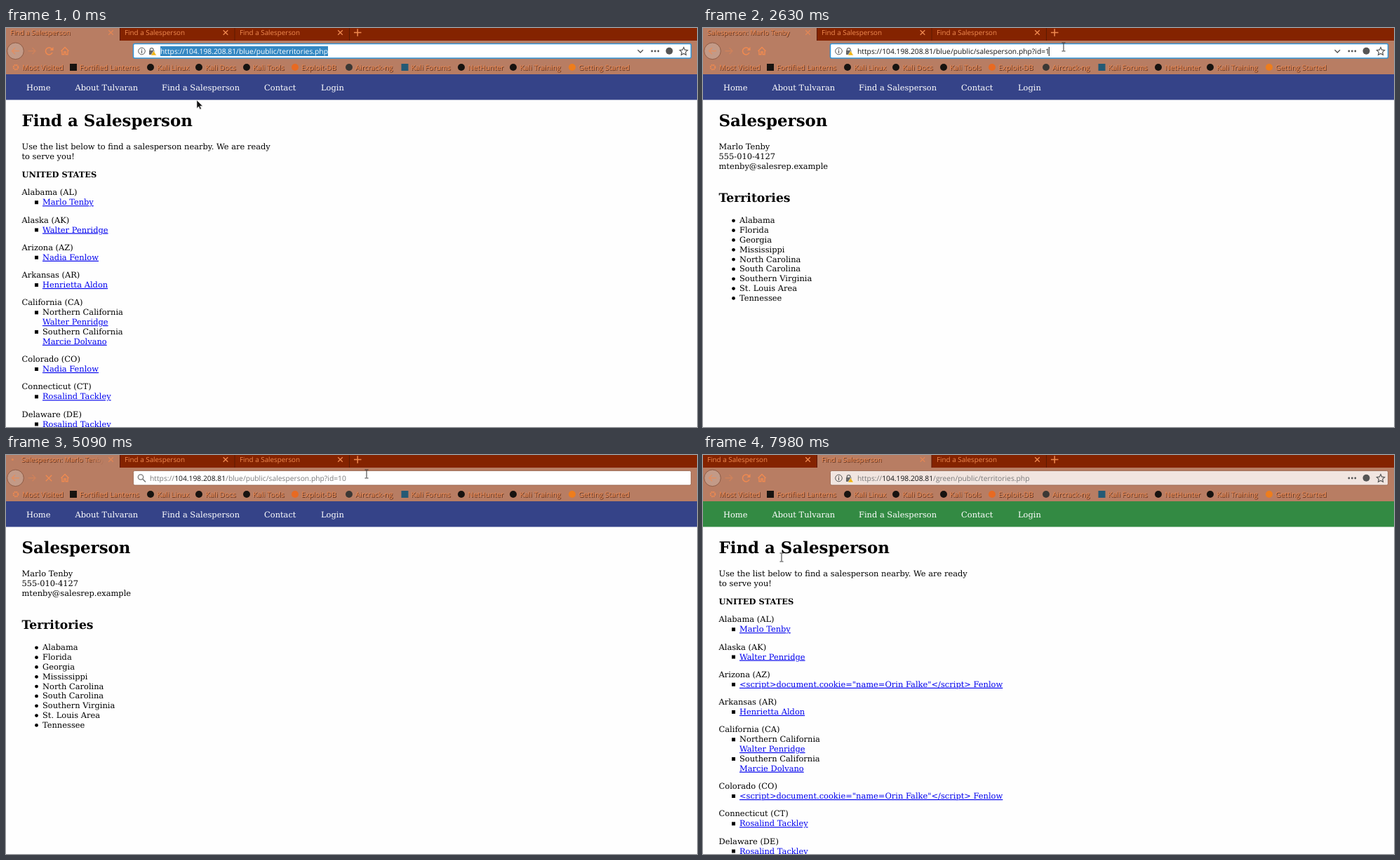
An HTML page for the animation above (8000 ms loop, 985 by 569 pixels).

```html
<!DOCTYPE html>
<html lang="en">
<head>
<meta charset="utf-8">
<title>Territories</title>
<style>
html, body { margin: 0; width: 100%; height: 100%; overflow: hidden; background: #fefefe }
svg { display: block; width: 100vw; height: 100vh; text-rendering: geometricPrecision }
.ui { font: 10.3px "Open Sans", "Noto Sans", sans-serif }
.page { font: 11.45px "DejaVu Serif", serif }
</style>
</head>
<body>
<svg id="stage" viewBox="0 0 985 569"></svg>
<script>
const LOOP = 8000, ORANGE = '#f08a50', BAR = '#b87d63', INK = '#111', GREY = '#777';
const HOST = '104.198.208.81', DETAIL = '/blue/public/salesperson.php?id=1';
const AGENT = 'Marlo Tenby', LIST_TITLE = 'Find a Salesperson';

const rect = (x, y, w, h, fill, more = '') =>
  `<rect x="${x}" y="${y}" width="${w}" height="${h}" fill="${fill}" ${more}/>`;
const dot = (x, y, r, fill, more = '') => `<circle cx="${x}" cy="${y}" r="${r}" fill="${fill}" ${more}/>`;
const line = (d, color, width = 1, more = '') =>
  `<path d="${d}" fill="none" stroke="${color}" stroke-width="${width}" ${more}/>`;
const shape = (d, fill, more = '') => `<path d="${d}" fill="${fill}" ${more}/>`;
const text = (x, y, s, fill = '#000', more = '') => `<text x="${x}" y="${y}" fill="${fill}" ${more}>${s}</text>`;
const embossed = (x, y, s, more = '') =>
  text(x + .8, y + .8, s, '#3a1405', more + ' opacity=".8"') + text(x, y, s, ORANGE, more);
const bold = size => `font-weight="700" font-size="${size}"`;
const between = (t, a, b) => t >= a && t < b;

// time, x, y, kind (a: arrow, i: text beam, h: hand)
const POINTER = [
  [0, 272, 103, 'a'], [160, 300, 70, 'a'], [300, 321, 48, 'a'], [440, 285, 85, 'a'],
  [580, 210, 140, 'a'], [720, 130, 190, 'a'], [860, 70, 225, 'a'], [1000, 40, 240, 'a'], [1140, 71, 247, 'h'],
  [1670, 110, 215, 'a'], [1810, 200, 160, 'a'], [1940, 320, 100, 'a'], [2080, 430, 56, 'a'],
  [2210, 490, 33, 'i'], [2360, 514, 27, 'i'], [3440, 514, 27, 'a'], [4430, 514, 27, 'i'],
  [5910, 440, 28, 'i'], [6040, 340, 20, 'a'], [6170, 262, 13, 'a'], [6300, 239, 9, 'a'],
  [7010, 235, 19, 'a'], [7150, 225, 30, 'i'], [7280, 215, 33, 'i'],
  [7710, 195, 36, 'i'], [7850, 150, 95, 'a'], [7980, 112, 146, 'i']
];

function pointer(t) {
  const [, x, y, kind] = POINTER.findLast(p => p[0] <= t);
  const art = {
    a: shape('M0 0V11.5L2.7 9L4.5 13L6.4 12.2L4.6 8.3H8.2Z', '#111', 'stroke="#ddd" stroke-width=".6"'),
    i: line('M-2.5 -6H-.6L0 -5.5L.6 -6H2.5M0 -5.5V5.5M-2.5 6H-.6L0 5.5L.6 6H2.5', '#333'),
    h: shape('M0 0Q1.2 -1.2 2 .5L3 3.5L6 4Q7.5 4.5 7 7L6 10.5H1.5L-3 6.5Q-3 5 -1 5.5L1 6Z', '#111',
      'stroke="#ddd" stroke-width=".5"')
  };
  return `<g transform="translate(${x} ${y})">${art[kind]}</g>`;
}

const cross = (x, y, r = 3.3) =>
  line(`M${x - r} ${y - r}l${2 * r} ${2 * r}m0 ${-2 * r}l${-2 * r} ${2 * r}`, ORANGE, 1.3);

function tabs(t) {
  const active = t >= 6550 ? 1 : 0, left = active ? 163 : 0;
  const detail = between(t, 1540, 5220);
  const loading = between(t, 1270, 2210) || between(t, 4430, 5490);
  const first = detail ? 'Salesperson: ' + AGENT : LIST_TITLE;
  const label = (i, x, s) => i === active ? embossed(x, 10, s, 'font-size="9.85"')
    : text(x, 10, s, ORANGE, 'font-size="9.85"');
  let s = rect(0, 0, 985, 18, '#842300') + rect(0, 18, 985, 48, BAR) + rect(left, 0, active ? 163 : 162, 19, BAR);
  for (const x of [162.5, 326, 489.5]) s += line(`M${x} 0V18`, '#5d1a02');
  s += label(0, loading ? 22 : 6, first);
  if (loading) {
    s += rect(120, 0, 20, 18, 'url(#fade)') + rect(140, 0, 22, 18, BAR);
    s += dot(8.5 + 3 * Math.sin(Math.floor(t / 133)), 6.5, 1.6, ORANGE, 'opacity=".7"');
  }
  s += label(1, 169, LIST_TITLE) + label(2, 333, LIST_TITLE);
  [149.5, 313, 476.5].forEach((x, i) => s += `<g opacity="${i === active ? .75 : 1}">${cross(x, 6.5)}</g>`);
  return s + line('M496 6.5H506.5M501.2 1.2V11.8', ORANGE, 1.5);
}

function buttons(t) {
  const stop = between(t, 1540, 2360) || between(t, 4430, 5360);
  return dot(13.5, 32.8, 11.8, '#c39a87', 'stroke="#80503a" stroke-width=".8"')
    + line('M19 32.8H8.5M13 28.3L8.5 32.8L13 37.3', ORANGE, 1.5, 'opacity=".65"')
    + line('M31.5 32.8H42M37.5 28.3L42 32.8L37.5 37.3', ORANGE, 1.4, 'opacity=".4"')
    + (stop ? cross(61, 33, 4.2)
      : line('M65.5 30A5 5 0 1 0 66 35', ORANGE, 1.5) + shape('M67.5 27V32H62.5Z', ORANGE))
    + line('M78.5 33L84 27.5L89.5 33M80 32.5V37.8H82.8V34H85.2V37.8H88V32.5', ORANGE, 1.4);
}

// label x, label, icon x, icon colour, square icon?
const BOOKMARKS = [
  [105, 'Fortified Lanterns', 96, '#171310', 1], [215.5, 'Kali Linux', 206, '#171310'],
  [284.5, 'Kali Docs', 275, '#171310'], [352, 'Kali Tools', 343, '#171310'],
  [421, 'Exploit-DB', 412, '#e86a22'], [498, 'Aircrack-ng', 489, '#3b3835'],
  [577.5, 'Kali Forums', 568.5, '#245a75', 1], [658.5, 'NetHunter', 649, '#171310'],
  [732.5, 'Kali Training', 723, '#171310'], [816, 'Getting Started', 807, '#ee7d1c']
];

const mark = (x, y, fill, square, r = 5) =>
  square ? rect(x - r, y - r, 2 * r, 2 * r, fill) : dot(x, y, r, fill);

function bookmarks() {
  return dot(14, 56, 3.3, 'none', `stroke="${ORANGE}" stroke-width="2" stroke-dasharray="1.7 .9"`)
    + embossed(23, 60, 'Most Visited')
    + BOOKMARKS.map(([x, s, ix, fill, sq]) => mark(ix, 56, fill, sq) + embossed(x, 60, s)).join('');
}

const magnifier = dot(192, 31.5, 3.7, 'none', 'stroke="#777" stroke-width="1.3"') + line('M194.7 34.3L199 38.5', '#777', 1.6);
const pageInfo = dot(193.5, 33, 4.8, 'none', 'stroke="#555"') + line('M193.5 32V36M193.5 30V31.2', '#555', 1.2)
  + rect(204, 32, 7.5, 6, '#666') + line('M205.3 32V30.5A2.4 2.4 0 0 1 210 30.5V32', '#666', 1.3)
  + shape('M210.5 32.5L214.5 39H206.5Z', '#f0b414', 'stroke="#fff" stroke-width=".5"');
const pageActions = [920.8, 925.3, 929.8].map(x => dot(x, 33, 1.4, '#555')).join('')
  + dot(945.5, 32.8, 5, '#555')
  + line('M966 27.6L967.7 31.2L971.6 31.7L968.7 34.4L969.5 38.3L966 36.4L962.5 38.3L963.3 34.4L960.4 31.7L964.3 31.2Z', '#555', 1.2);

function addressBar(t) {
  const typed = between(t, 3440, 5220);
  const focus = t < 1270 || between(t, 2490, 4430);
  const selected = t < 1270 || between(t, 2490, 2630);
  const hover = between(t, 2210, 6040) || between(t, 7150, 7850);
  const path = typed ? DETAIL + '0' : between(t, 1540, 3440) ? DETAIL
    : `/${t < 6550 ? 'blue' : 'green'}/public/territories.php`;
  const chevron = typed ? 0 : focus || hover ? 1 : between(t, 1270, 1410) ? .6 : between(t, 1410, 1540) ? .25 : 0;
  const hostInk = selected ? '#fff' : INK, ink = selected ? '#fff' : focus ? INK : GREY;
  let s = rect(181.5, 22.5, 795, 20.5, focus || hover ? '#fff' : '#f1e5e0',
    `rx="2" stroke="${focus ? '#3295d8' : '#94614b'}" stroke-width="${focus ? 1.5 : .8}"`);
  if (selected) s += rect(220, 26, t < 1270 ? 239 : 273, 14, '#3488c3');
  s += typed ? magnifier : pageInfo + pageActions;
  s += text(typed ? 205 : 220, 37, `https://<tspan fill="${hostInk}">${HOST}</tspan>${path}`, ink);
  if (between(t, 2630, 3440)) s += line('M493.3 27V40', '#000', .9);
  if (typed && focus) s += line('M960 33H971M966.5 28.5L971 33L966.5 37.5', '#555', 1.4);
  return s + line('M900.5 31.3L904.3 35L908.1 31.3', '#555', 1.4, `opacity="${chevron}"`);
}

const globe = (y, color) => dot(195, y, 5, 'none', `stroke="${color}"`)
  + line(`M190 ${y}H200M195 ${y - 5}V${y + 5}M195 ${y - 5}Q190 ${y} 195 ${y + 5}Q200 ${y} 195 ${y - 5}`, color, .8);

// colour, square?
const ENGINES = [['#4285f4'], ['#0c8484', 1], ['#2b2622', 1], ['#d0104f'], ['#de5833'], ['#e0433f', 1], ['#1da1f2'], ['#333', 1]];

function suggestions(t) {
  if (!between(t, 3440, 4430)) return '';
  const url = `https://${HOST}${DETAIL}0`, shift = t < 3850 ? 0 : t < 4000 ? 11 : 22;
  let s = rect(0, 47, 985, 53 - shift, '#fafafa') + rect(3, 52, 982, 21.5, '#1c8ed0')
    + globe(62.5, '#fff') + text(207, 66.5, url, '#fff', bold(10.3)) + text(507, 66.5, '— Visit', '#d8ecf8', 'font-size="9.5"');
  if (!shift) s += rect(175, 81, 8, 6, '#555') + rect(173, 87.3, 12, 1.8, '#555') + globe(84.5, '#555')
    + text(207, 88.7, 'Salesperson: Mocky MacMockford (NOT PUBLIC UNTIL SEPT. 1)', INK)
    + text(520, 88.7, '— <tspan x="534.5" fill="#0a84e0">Switch to Tab</tspan>', GREY, 'font-size="9.5"');
  s += `<g transform="translate(0 ${-shift})">` + rect(0, 99, 985, 47, '#ebebeb')
    + line('M0 99.5H985M0 121.5H985', '#c4c4c4', .8)
    + text(4, 114, `Search for <tspan x="56" fill="${INK}">${url}</tspan> with:`, '#888')
    + rect(0, 146, 985, 4.5, 'url(#shade)');
  ENGINES.forEach(([fill, square], i) => {
    s += mark(18 + 35.55 * i, 133, fill, square, 4.8);
    if (i) s += line(`M${35.55 * i} 126V140`, '#aaa', .8);
  });
  return s + '</g>';
}

const link = (y, s) => text(52, y, s, '#0000ee', 'text-decoration="underline"');
const square = y => rect(41, y - 6, 5, 5, '#000');

function listPage(green) {
  const robert = 'Walter Penridge', barbara = 'Rosalind Tackley';
  const irene = green ? '&lt;script&gt;document.cookie="name=Orin Falke"&lt;/script&gt; Fenlow' : 'Nadia Fenlow';
  const entry = (y, state, name) => text(22.5, y, state) + square(y + 14) + link(y + 14, name);
  return text(22.5, 140, LIST_TITLE, '#000', bold(22.9))
    + text(22.5, 173, 'Use the list below to find a salesperson nearby. We are ready') + text(22.5, 187, 'to serve you!')
    + text(22.5, 213, 'UNITED STATES', '#000', bold(11.45))
    + entry(238.2, 'Alabama (AL)', AGENT) + entry(277.5, 'Alaska (AK)', robert)
    + entry(316.8, 'Arizona (AZ)', irene) + entry(356, 'Arkansas (AR)', 'Henrietta Aldon')
    + text(22.5, 395.3, 'California (CA)')
    + square(409.3) + text(52, 409.3, 'Northern California') + link(423, robert)
    + square(436.9) + text(52, 436.9, 'Southern California') + link(450.7, 'Marcie Dolvano')
    + entry(476, 'Colorado (CO)', irene) + entry(515.3, 'Connecticut (CT)', barbara)
    + entry(554.5, 'Delaware (DE)', barbara);
}

function detailPage() {
  const places = ['Alabama', 'Florida', 'Georgia', 'Mississippi', 'North Carolina', 'South Carolina',
    'Southern Virginia', 'St. Louis Area', 'Tennessee'];
  return text(22.5, 140, 'Salesperson', '#000', bold(22.9))
    + [AGENT, '555-010-4127', 'mtenby@salesrep.example'].map((s, i) => text(22.5, 173 + 13.85 * i, s)).join('')
    + text(22.5, 248, 'Territories', '#000', bold(17.2))
    + places.map((s, i) => dot(43.5, 274.8 + 13.83 * i, 2.4, '#000') + text(52, 278.2 + 13.83 * i, s)).join('');
}

function page(t) {
  const green = t >= 6550;
  const menu = [[29, 'Home'], [98.5, 'About Tulvaran'], [222, LIST_TITLE], [368, 'Contact'], [449, 'Login']];
  return rect(0, 0, 985, 569, '#fefefe') + rect(0, 66, 985, 36.5, green ? '#338a43' : '#354388')
    + menu.map(([x, s]) => text(x, 89.3, s, '#fff')).join('')
    + (between(t, 1540, 5220) ? detailPage() : listPage(green))
    + (between(t, 1270, 1540) ? rect(51.3, 241.3, 77, 13.4, 'none', 'stroke="#55f" stroke-width=".8" stroke-dasharray="1 .7"') : '');
}

const defs = `<defs><linearGradient id="fade"><stop stop-color="${BAR}" stop-opacity="0"/><stop offset="1" stop-color="${BAR}"/></linearGradient>
<linearGradient id="shade" x2="0" y2="1"><stop stop-opacity=".25"/><stop offset="1" stop-opacity="0"/></linearGradient></defs>`;

const stage = document.getElementById('stage');
let shown = '';
function draw(now) {
  const t = now % LOOP;
  const scene = `${defs}<g class="page">${page(t)}</g><g class="ui">${tabs(t)}${buttons(t)}${bookmarks()}${addressBar(t)}${suggestions(t)}</g>${pointer(t)}`;
  if (scene !== shown) stage.innerHTML = shown = scene;
  requestAnimationFrame(draw);
}
draw(performance.now());
</script>
</body>
</html>
```
